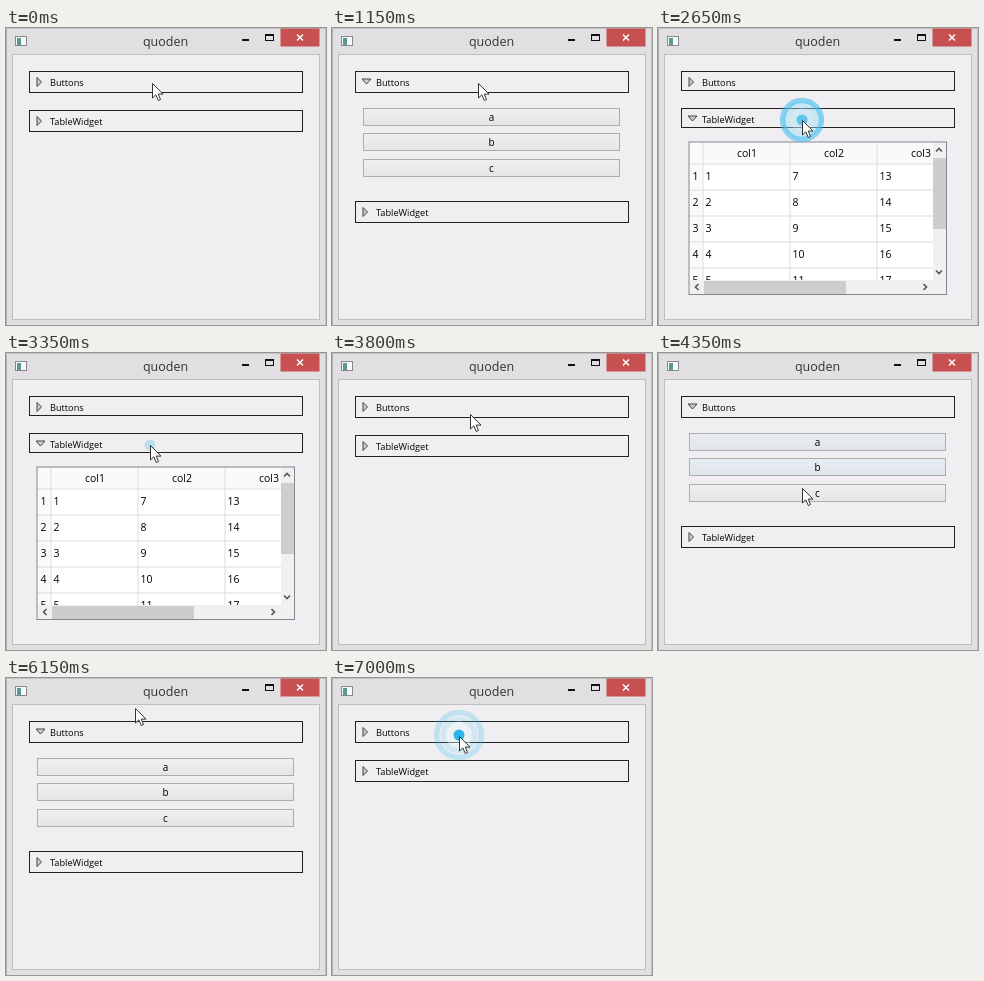
These frames come from a looping animation (320x297 px, 7050 ms). An HTML page with a canvas:

```html
<!DOCTYPE html>
<html lang="en">
<head>
<meta charset="utf-8">
<style>
  html, body { margin: 0; width: 100%; height: 100%; overflow: hidden; background: #e1dfe1; }
  canvas { display: block; }
</style>
</head>
<body>
<canvas id="stage" width="320" height="297"></canvas>
<script>
const ctx = document.getElementById('stage').getContext('2d');
const LOOP = 7050, STEP = 50;

// start, duration, x, y, panel that is toggled
const clicks = [
  [600, 550, 146, 55, 'buttons'], [1550, 600, 146, 55, 'buttons'],
  [2400, 650, 144, 92, 'table'], [3350, 400, 144, 92, 'table'],
  [3950, 400, 138, 61, 'buttons'], [4750, 700, 144, 182, 'table'],
  [5600, 450, 144, 182, 'table'], [6550, 650, 127, 57, 'buttons']
];

// time, x, y
const path = [
  [0, 146, 55], [2050, 146, 55], [2200, 144, 92], [3500, 144, 92],
  [3800, 138, 61], [4150, 138, 61], [4350, 144, 135], [4650, 144, 182],
  [5850, 144, 182], [6100, 130, 20], [6250, 127, 50], [6350, 127, 50],
  [6500, 127, 58], [LOOP, 127, 58]
];

function rect(x, y, w, h, fill, stroke) {
  if (fill) { ctx.fillStyle = fill; ctx.fillRect(x, y, w, h); }
  if (stroke) { ctx.strokeStyle = stroke; ctx.strokeRect(x, y, w, h); }
}

function poly(points, fill, stroke, closed = true) {
  ctx.beginPath();
  points.forEach(([x, y]) => ctx.lineTo(x, y));
  if (closed) ctx.closePath();
  if (fill) { ctx.fillStyle = fill; ctx.fill(); }
  if (stroke) { ctx.strokeStyle = stroke; ctx.stroke(); }
}

function label(text, x, y, size, align = 'left', color = '#000') {
  ctx.font = `${size}px "Open Sans", "Noto Sans", sans-serif`;
  ctx.textAlign = align;
  ctx.fillStyle = color;
  ctx.fillText(text, x, y);
}

function drawWindow() {
  rect(0, 0, 320, 297, '#e1dfe1');
  rect(0, 0, 1, 297, '#b0aeb0');
  rect(319, 0, 1, 297, '#c4c2c4');
  rect(0, 0, 320, 1, '#c4c2c4');
  rect(6.5, 26.5, 307, 265, '#f0eef0', '#c0bec0');

  rect(9.5, 8.5, 11, 9, '#fafafa', '#888');
  rect(11, 10, 4, 7, '#5a9896');
  label('quoden', 159.5, 18, 12.5, 'center', '#333');

  rect(236, 11, 7, 2, '#111');
  rect(259.5, 6.5, 8, 6, null, '#111');
  rect(259, 6, 9, 2, '#111');
  rect(274.5, .5, 39, 18, '#c75050');
  ctx.lineWidth = 1.5;
  poly([[291, 6.5], [297, 12.5]], null, '#fff', false);
  poly([[297, 6.5], [291, 12.5]], null, '#fff', false);
  ctx.lineWidth = 1;
}

function drawHeader(text, y, h, open) {
  const mid = y + 10.5;
  rect(23.5, y, 273, h, '#f0eef0', '#222');
  const arrow = open
    ? [[30, mid - 3], [39, mid - 3], [34.5, mid + 2]]
    : [[31, mid - 4.5], [31, mid + 4.5], [35.5, mid]];
  poly(arrow, '#ccc', '#444');
  label(text, 44, mid + 3.7, 9.2);
}

function drawButtons(top, t) {
  [4300, 4380, 4540].forEach((peak, i) => {
    const y = Math.floor(top + 25.5 * i) + .5;
    const glow = Math.max(0, 1 - Math.abs(t - peak) / 200);
    const shade = ctx.createLinearGradient(0, y, 0, y + 17);
    shade.addColorStop(0, '#f0f0f1');
    shade.addColorStop(1, '#e5e5e6');
    rect(31.5, y, 256, 17, shade, '#adadad');
    rect(32, y + .5, 255, 16, `rgba(215,228,245,${glow * .4})`);
    label('abc'[i], 159.5, y + 12.5, 10, 'center');
  });
}

function chevron(x, y, dx, dy) {
  ctx.lineWidth = 1.6;
  poly([[x - dx * 1.5 - dy * 3, y - dy * 1.5 - dx * 3], [x + dx * 1.5, y + dy * 1.5],
    [x - dx * 1.5 + dy * 3, y - dy * 1.5 + dx * 3]], null, '#555', false);
  ctx.lineWidth = 1;
}

function drawTable(top) {
  const bottom = 267, viewBottom = 252;
  rect(31, top, 258, bottom - top, '#fff');
  ctx.save();
  ctx.beginPath();
  ctx.rect(31, top, 244, viewBottom - top);
  ctx.clip();
  rect(31, top, 244, 21, '#fbfafb');
  rect(31, top, 13, 160, '#fbfafb');
  for (let col = 0; col < 3; col++) {
    const x = 44.5 + 87 * col;
    rect(x, top, 1, 160, '#dcdcdc');
    label('col' + (col + 1), x + 44.5, top + 15, 10.5, 'center');
  }
  for (let row = 0; row < 5; row++) {
    const y = top + 21 + 26 * row;
    rect(31, y + .5, 244, 1, '#dcdcdc');
    label(row + 1, 37.5, y + 17, 10.5, 'center');
    for (let col = 0; col < 3; col++) label(row + 1 + col * 6, 47.5 + 87 * col, y + 17, 10.5);
  }
  ctx.restore();

  rect(275, top, 14, bottom - top, '#f0f0f0');
  rect(31, viewBottom, 258, 15, '#f0f0f0');
  rect(275, top + 16, 13, top > 150 ? 15 : 71, '#cdcdcd');
  rect(46, viewBottom + 1, 142, 13, '#cdcdcd');
  chevron(281, top + 8, 0, -1);
  chevron(281, 244, 0, 1);
  chevron(39, 259, -1, 0);
  chevron(267, 259, 1, 0);
  rect(31, top, 257.5, bottom - top - .5, null, '#828790');
}

function disc(x, y, r, rgb, alpha) {
  ctx.beginPath();
  ctx.arc(x, y, r, 0, 7);
  ctx.fillStyle = `rgba(${rgb},${Math.max(0, alpha)})`;
  ctx.fill();
}

function ring(x, y, r, alpha) {
  ctx.beginPath();
  ctx.arc(x, y, r, 0, 7);
  ctx.lineWidth = 5.5;
  ctx.strokeStyle = `rgba(60,190,238,${Math.max(0, alpha)})`;
  ctx.stroke();
  ctx.lineWidth = 1;
}

function drawRipple(u, x, y) {
  const radius = age => 23.5 * (1 - Math.exp(-age / .22));
  const fade = Math.min(1, (1 - u) * 4);
  disc(x, y, radius(u), '150,216,246', .9 - 1.25 * u);
  disc(x, y, radius(u) * .6, '235,248,253', .6 * u * fade);
  ring(x, y, radius(u), .95 - u);
  if (u > .45) ring(x, y, radius(u - .45), .5 * (1 - u));
  disc(x, y, 5.5, '30,176,234', Math.min(.95, .25 + u) * fade);
}

function drawCursor(t) {
  const i = path.findIndex(p => p[0] > t);
  const [t0, x0, y0] = path[i - 1], [t1, x1, y1] = path[i];
  const k = (t - t0) / (t1 - t0);
  ctx.save();
  ctx.translate(Math.round(x0 + (x1 - x0) * k) + .5, Math.round(y0 + (y1 - y0) * k) + .5);
  poly([[0, 0], [0, 14.5], [3.3, 11.3], [5.8, 17], [8, 16], [5.7, 10.6], [10.5, 10.6]], '#fff', '#333');
  ctx.restore();
}

function draw(t) {
  const open = { buttons: false, table: false };
  for (const [start, , , , panel] of clicks) {
    if (t >= start + STEP) open[panel] = !open[panel];
  }
  // an open table squeezes the headers and pulls the content up
  const h = open.table ? 19 : 21;
  const second = (open.buttons ? 173.5 : 82.5) - (open.table ? 2 : 0);

  drawWindow();
  drawHeader('Buttons', 43.5, h, open.buttons);
  drawHeader('TableWidget', second, h, open.table);
  if (open.buttons) drawButtons(59 + h, t);
  if (open.table) drawTable(second + 33.5);
  for (const [start, length, x, y] of clicks) {
    const u = (t - start) / length;
    if (u >= 0 && u < 1) drawRipple(u, x, y);
  }
  drawCursor(t);
}

const begin = performance.now();
function frame() {
  const t = (performance.now() - begin) % LOOP;
  draw(Math.floor(t / STEP) * STEP);
  requestAnimationFrame(frame);
}
frame();
</script>
</body>
</html>
```
